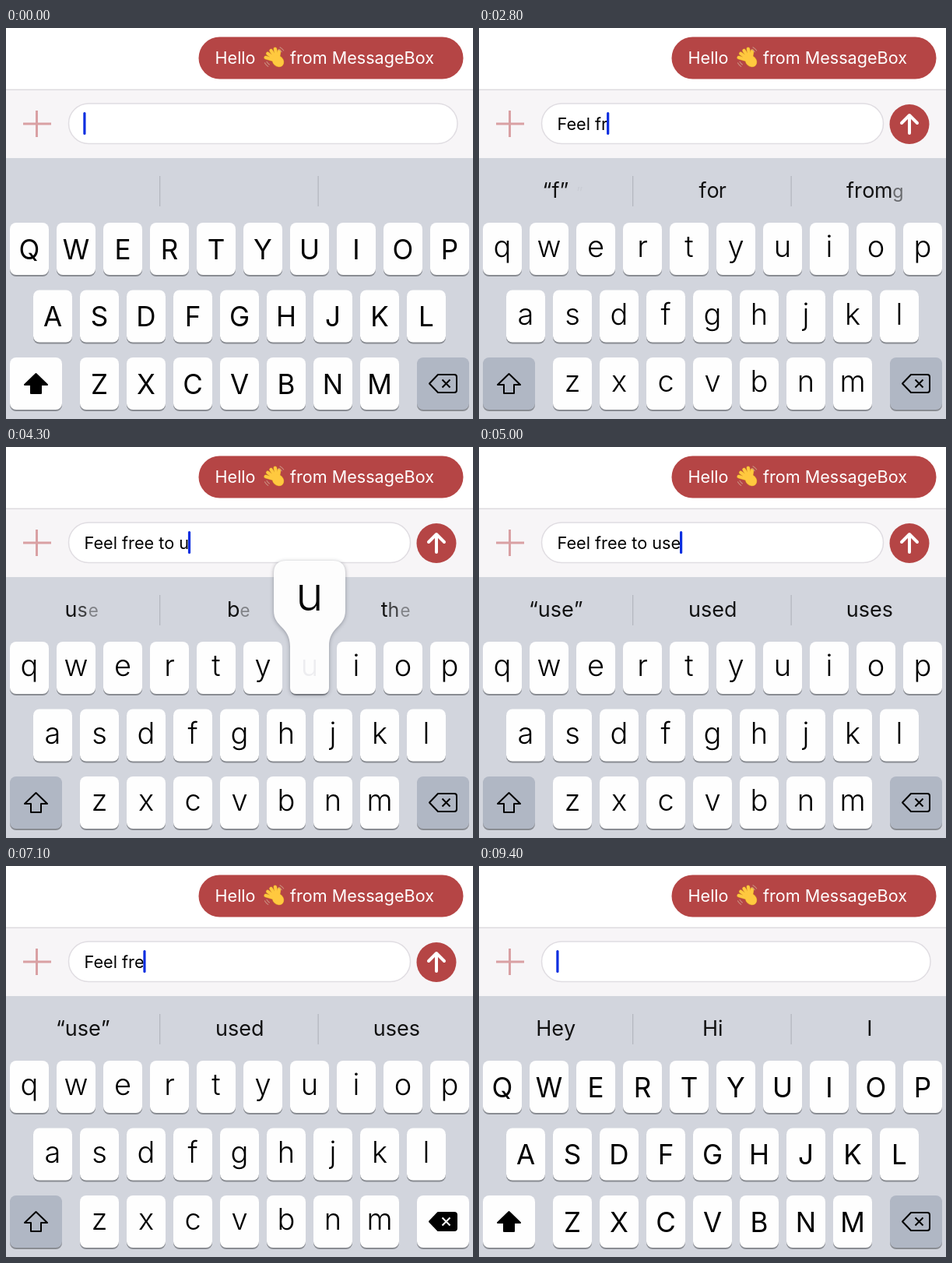
Animation of 600 by 502 pixels, one loop 9.5 s. Source, as an HTML page with a canvas:

```html
<!DOCTYPE html>
<html lang="en">
<head>
<meta charset="utf-8">
<title>Chat input</title>
<style>
  html, body { margin: 0; width: 100%; height: 100%; overflow: hidden; background: #fff; }
  canvas { display: block; width: 600px; height: 502px; }
</style>
</head>
<body>
<canvas id="stage"></canvas>
<script>
const LOOP = 9500, STEP = 200, FADE = 110;
const RED = '#b54545', WHITE_KEY = '#fefefe', DARK_KEY = '#b0b7c4', CURSOR = '#0b2ee0';
const FONT = 'Inter, "Liberation Sans", sans-serif';

// Each word starts at its own time; its letters follow at an even pace.
const WORDS = { 'Feel ': 1450, 'free ': 2490, 'to ': 3690, 'use': 4290 };
const MESSAGE = Object.keys(WORDS).join('');
const TYPED = Object.entries(WORDS).flatMap(([word, at]) => [...word].map((_, i) => at + i * STEP));

// Holding delete: one letter on press, then automatic repeat after half a second.
const PRESS = 6000, RELEASE = 8050;
const DELETED = [...MESSAGE].map((_, i) => PRESS + (i && 400 + i * 100));
const EDITS = [...TYPED, ...DELETED];

const SUGGESTIONS = {
  'F': '“F” For From',
  'Fe': '“Fe” Few Feel',
  'Feel': '“Feel” Feels Feeling',
  'Feel f': '“f” for from',
  'Feel fre': '“fre” free fresh',
  'Feel free ': 'to and for',
  'Feel free t': '“t” to the',
  'Feel free to ': 'use be the',
  'Feel free to use': '“use” used uses'
};
const HINTS = [
  { at: -1000, words: ['', '', ''] },
  { at: 100, words: ['Hey', 'Hi', 'I'] },
  ...Object.entries(SUGGESTIONS).map(([typed, list]) =>
    ({ at: TYPED[typed.length - 1] - 35, words: list.split(' ') })),
  { at: 8000, words: ['Hey', 'Hi', 'I'] }
];

// Every row of keys is centred on the stage.
const KEYS = {};
['qwertyuiop', 'asdfghjkl', 'zxcvbnm'].forEach((row, r) =>
  [...row].forEach((ch, i) => KEYS[ch] = { x: 330 - 30 * row.length + 60 * i, y: 250 + 86.5 * r }));

const SHIFT_ICON = 'M38.5 444l14.5 14h-8v11h-13v-11h-8z';
const DELETE_ICON = 'M544 456.5l11-11.5h21q3 0 3 3v17q0 3-3 3h-21z';
const POPUP = 'M-46-88q0-16 16-16h60q16 0 16 16v48c0 22-21 20-21 46v53q0 8-8 8h-34q-8 0-8-8V6c0-26-21-24-21-46z';

const canvas = document.getElementById('stage'), g = canvas.getContext('2d');
const dpr = window.devicePixelRatio || 1;
canvas.width = 600 * dpr;
canvas.height = 502 * dpr;

const clamp = v => Math.min(1, Math.max(0, v));
const ramp = (t, start, length) => clamp((t - start) / length);
const smooth = p => p * p * (3 - 2 * p);

function box(x, y, w, h, r, fill, stroke) {
  g.beginPath();
  g.roundRect(x, y, w, h, r);
  g.fillStyle = fill;
  g.fill();
  if (stroke) { g.strokeStyle = stroke; g.lineWidth = 1.5; g.stroke(); }
}

function line(path, color, width, filled) {
  const shape = new Path2D(path);
  g.strokeStyle = g.fillStyle = color;
  g.lineWidth = width;
  g.stroke(shape);
  if (filled) g.fill(shape);
}

function text(str, x, y, size, color = '#000', align = 'left', weight = 400) {
  g.font = `${weight} ${size}px ${FONT}`;
  g.fillStyle = color;
  g.textAlign = align;
  g.fillText(str, x, y);
}

function faded(alpha, draw) {
  g.save();
  g.globalAlpha = alpha;
  draw();
  g.restore();
}

function wavingHand() {
  g.save();
  g.translate(345, 37.5);
  g.lineCap = 'round';
  for (const [color, grow] of [['#d9962b', 1], ['#ffc93f', 0]]) {
    g.strokeStyle = g.fillStyle = color;
    g.lineWidth = 3.8 + grow;
    g.beginPath();
    for (let i = 0; i < 5; i++) {
      const angle = -2.85 + i * 0.36, reach = i < 4 ? 16 : 13;
      g.moveTo(4, 5);
      g.lineTo(4 + reach * Math.cos(angle), 5 + reach * Math.sin(angle));
    }
    g.stroke();
    g.beginPath();
    g.ellipse(4.5, 5, 8 + grow / 2, 6.5 + grow / 2, 0.8, 0, 7);
    g.fill();
  }
  g.strokeStyle = '#c98f80';
  g.lineWidth = 1.1;
  for (const side of [-0.85, 2.4])
    for (const r of [11.5, 14.5]) {
      g.beginPath();
      g.arc(0, 0, r, side - 0.22, side + 0.22);
      g.stroke();
    }
  g.restore();
}

function cursor(x, idle) {
  const hidden = clamp(1.4 - Math.abs(idle % 1000 - 800) / 140);
  faded(1 - hidden, () => box(x, 108, 3.2, 29, 1.5, CURSOR));
}

function topArea(t, count, idle) {
  box(0, 0, 600, 80, 0, '#fff');
  box(247.5, 11.5, 340, 54, 27, RED);
  text('Hello', 268.5, 46, 21.6, '#fff');
  wavingHand();
  text('from MessageBox', 365, 46, 21.6, '#fff');
  box(0, 79, 600, 88, 0, '#f7f5f7');
  box(0, 78.5, 600, 1.5, 0, '#dedcdf');
  line('M22 123h36M39.5 106v34', '#d9a0a3', 3);

  const empty = EDITS.at(-1);
  const shrink = smooth(ramp(t, TYPED[0] + 20, STEP) - ramp(t, empty, STEP));
  box(80.5, 97, 499.5 - 60.5 * shrink, 51.5, 25.7, '#fff', '#e0dde2');
  faded(ramp(t, TYPED[0] + 150, STEP) - ramp(t, empty, 100), () => {
    box(527.5, 98, 51, 51, 25.5, RED);
    g.lineCap = g.lineJoin = 'round';
    line('M553 135v-23M543 122l10-10 10 10', '#fff', 4);
  });

  const typed = MESSAGE.slice(0, count);
  text(typed, 100.5, 131, 21.7);
  cursor(99.3 + g.measureText(typed).width, idle);
}

// Letters of a suggestion appear and vanish one after another, left to right.
function hint(word, center, phase) {
  const width = str => {
    g.font = `400 27px ${FONT}`;
    return g.measureText(str).width;
  };
  const left = center - width(word) / 2;
  [...word].forEach((ch, i) => {
    const p = phase(i, word.length), x = left + width(word.slice(0, i));
    if (p > 0) faded(p, () => text(ch, x, 218, 27 * (0.7 + 0.3 * p), '#111'));
  });
}

function hints(t) {
  const now = HINTS.findLastIndex(h => t >= h.at);
  const age = t - HINTS[now].at;
  for (let i = 0; i < 3; i++) {
    const center = 98.5 + 201.7 * i;
    if (now) hint(HINTS[now - 1].words[i], center, k => 1 - ramp(age, k * 50, 100));
    hint(HINTS[now].words[i], center, (k, n) => ramp(age, 50 + 120 * k / Math.max(1, n - 1), 180));
  }
  for (const x of [197, 400.5]) box(x, 190, 1.3, 39, 0, '#b4b8c0');
}

function key(x, y, w, fill) {
  box(x, y + 2, w, 67, 8, '#898c92');
  box(x, y, w, 67, 8, fill);
}

function keyLabel(ch, x, y, caps, color) {
  if (caps) text(ch.toUpperCase(), x, y + 46.7, 35, color, 'center');
  else text(ch, x, y + 44, 38, color, 'center', 350);
}

function keyboard(caps, deleting) {
  for (const [ch, { x, y }] of Object.entries(KEYS)) {
    key(x - 25, y, 50, WHITE_KEY);
    keyLabel(ch, x, y, caps);
  }
  g.lineJoin = 'round';
  key(5, 423, 67, caps ? WHITE_KEY : DARK_KEY);
  line(SHIFT_ICON, '#000', 2, caps);
  key(528, 423, 67, deleting ? WHITE_KEY : DARK_KEY);
  line(DELETE_ICON, '#000', 2, deleting);
  line('M560.5 451.5l10 10m0-10l-10 10', deleting ? '#fff' : '#000', 2);
}

function popup(ch, x, y, caps) {
  g.translate(x, y);
  g.save();
  g.shadowColor = 'rgba(60,65,75,.45)';
  g.shadowBlur = 5 * dpr;
  g.shadowOffsetY = dpr;
  g.fillStyle = WHITE_KEY;
  g.fill(new Path2D(POPUP));
  g.restore();
  keyLabel(ch, 0, 0, caps, '#ededf0');
  text(caps ? ch.toUpperCase() : ch, 0, -40, caps ? 54 : 60, '#000', 'center', 350);
}

function popups(t) {
  TYPED.forEach((at, i) => {
    const ch = MESSAGE[i].toLowerCase(), spot = KEYS[ch];
    if (!spot || t < at - 80 || t >= at + FADE) return;
    faded(1 - ramp(t, at, FADE) ** 2, () => popup(ch, spot.x, spot.y, i === 0));
  });
}

const start = performance.now();
function frame() {
  const t = (performance.now() - start) % LOOP;
  const done = EDITS.filter(at => t >= at).length;
  const count = Math.min(done, EDITS.length - done);
  const idle = t - (done ? EDITS[done - 1] : EDITS.at(-1) - LOOP);
  g.setTransform(dpr, 0, 0, dpr, 0, 0);
  topArea(t, count, idle);
  box(0, 167, 600, 335, 0, '#d2d5dd');
  hints(t);
  keyboard(count === 0, t >= PRESS && t < RELEASE);
  popups(t);
  requestAnimationFrame(frame);
}
frame();
</script>
</body>
</html>
```
